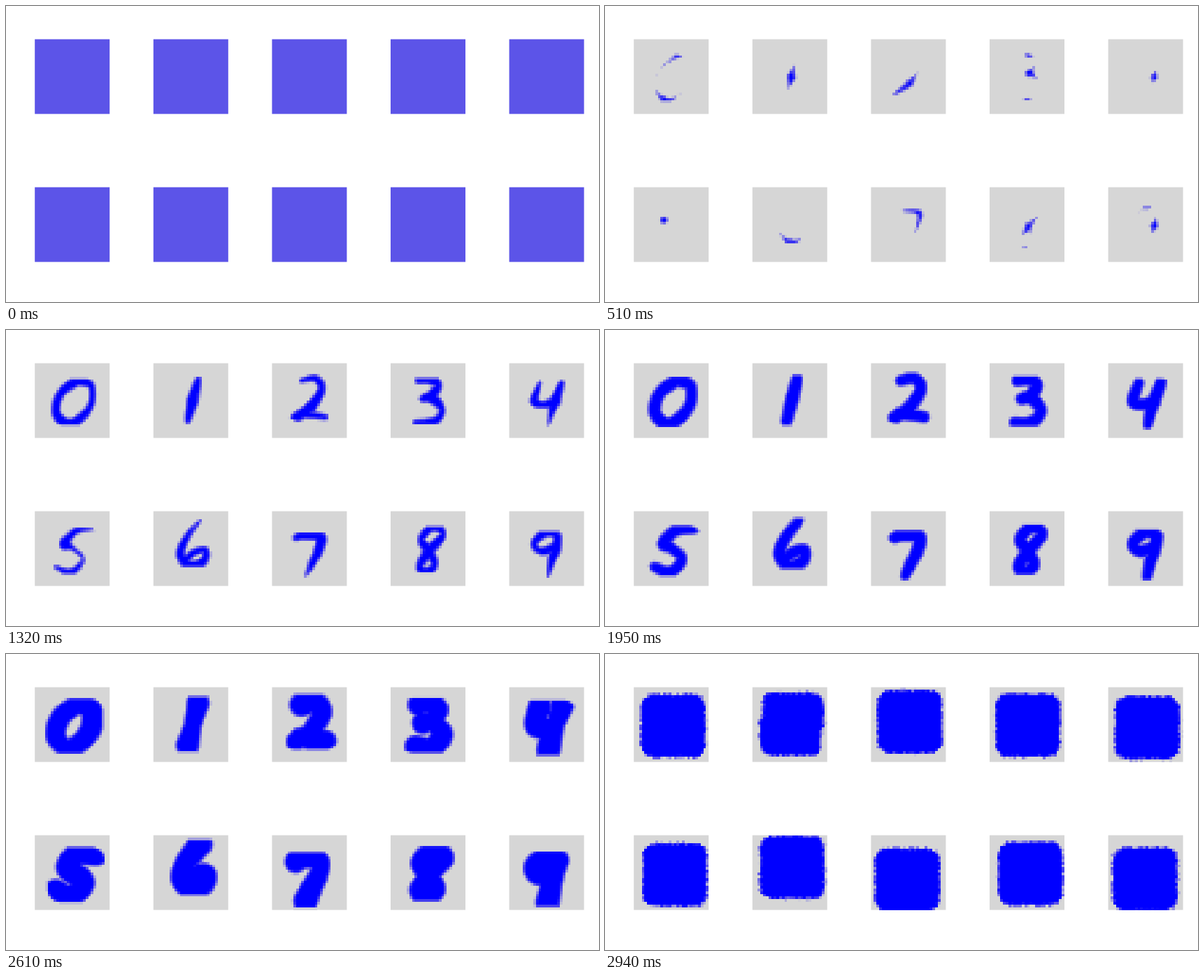
An HTML page with a canvas that plays this animation: 848x424 px, repeating every 2970 ms.

```html
<!DOCTYPE html>
<html lang="en">
<head>
<meta charset="utf-8">
<title>Digit quantiles</title>
<style>
html, body { margin: 0; width: 100%; height: 100%; overflow: hidden; background: #fff; }
canvas { display: block; }
</style>
</head>
<body>
<canvas id="stage" width="848" height="424"></canvas>
<script>
const ctx = document.getElementById('stage').getContext('2d');
const N = 28, SIZE = 107, CELL = SIZE / N, STEP = 30, FRAMES = 99;
const LOW = [214, 214, 214], MID = [92, 84, 232], HIGH = [0, 0, 255];

const clamp = (v, lo = 0, hi = 1) => Math.min(hi, Math.max(lo, v));
const mix = (a, b, t) => a + (b - a) * t;

// Smooth curve through key points [x, y, strength], sampled densely
function spline(pts) {
  const out = [];
  for (let i = 0; i < pts.length - 1; i++) {
    const p = pts[Math.max(i - 1, 0)], a = pts[i], b = pts[i + 1], n = pts[Math.min(i + 2, pts.length - 1)];
    for (let t = 0; t <= 1; t += 0.125) {
      const curve = k => a[k] + 0.5 * t * (b[k] - p[k] +
        t * (2 * p[k] - 5 * a[k] + 4 * b[k] - n[k] + t * (3 * (a[k] - b[k]) + n[k] - p[k])));
      out.push({ x: curve(0), y: curve(1), s: mix(a[2], b[2], t) });
    }
  }
  return out;
}

const digits = [];
function digit(...strokes) {
  const i = digits.length, dots = strokes.flatMap(spline);
  const middle = vals => (Math.min(...vals) + Math.max(...vals)) / 2;
  digits.push({
    x: 41.2 + 169.6 * (i % 5), y: 47.6 + 212 * Math.floor(i / 5), dots,
    cx: middle(dots.map(d => d.x)), cy: middle(dots.map(d => d.y))
  });
}

// Strength: 1 is inked in nearly every sample, 0 only in rare ones
digit([[62, 24, .85], [81, 33, .45], [79, 62, .45], [58, 84, .75], [42, 85, .9], [30, 68, .6], [38, 42, .62], [62, 24, .85]]);
digit([[64, 23, .3], [56, 54, 1], [49, 83, .3]]);
digit([[42, 25, .2], [62, 22, .5], [71, 37, .5], [55, 63, .95], [34, 78, .75]],
  [[40, 72, .6], [56, 74, .45], [76, 77, .3]]);
digit([[40, 25, .4], [55, 23, .85], [68, 32, .45], [56, 49, .95]],
  [[46, 51, .4], [58, 49, .95], [73, 65, .4], [68, 79, .45], [54, 86, .8], [36, 85, .35]]);
digit([[44, 28, .15], [36, 54, .62], [50, 59, .4], [66, 55, .9]],
  [[76, 26, .18], [66, 53, .9], [60, 72, .3], [56, 90, 0]]);
digit([[88, 26, 0], [62, 27, .4], [49, 37, .45], [43, 47, .95], [52, 52, .25], [69, 68, .12], [52, 87, .5], [30, 80, .15]]);
digit([[67, 13, .05], [48, 37, .45], [39, 62, .6], [54, 79, .95], [72, 71, .6], [74, 56, .45], [58, 59, .4], [46, 70, .5]]);
digit([[34, 38, .35], [46, 34, .72], [69, 37, .9], [66, 57, .75], [58, 73, .5], [48, 94, 0]]);
digit([[55, 57, .9], [44, 40, .4], [60, 23, .65], [75, 33, .4], [55, 57, .95], [42, 78, .4], [50, 87, .75], [63, 77, .35], [55, 57, .9]]);
digit([[70, 36, .45], [55, 29, .8], [36, 45, .42], [44, 57, .4], [64, 53, .8]],
  [[70, 36, .45], [66, 55, .95], [60, 73, .45], [55, 96, 0]]);

function noise(i, j, k) {
  const s = Math.sin(i * 127.1 + j * 311.7 + k * 74.7) * 43758.5453;
  return s - Math.floor(s) - 0.5;
}

// Half-width of the ink at quantile q: strong parts first, weak tips flare late
function halfWidth(s, q) {
  const thin = mix(-13, 5, s), mid = mix(-2, 8, Math.sqrt(s)), wide = mix(21, 13, s);
  if (q < 0.17) return thin - 7 * (1 - q / 0.17);
  if (q < 0.44) return mix(thin, mid, (q - 0.17) / 0.27);
  if (q < 0.92) {
    const u = (q - 0.44) / 0.48;
    return mix(mid, wide, u * (0.45 + 0.4 * u + 0.15 * u * u));
  }
  return wide + 30 * ((q - 0.92) / 0.06) ** 1.8;
}

// Signed depth inside the rounded frame that limits the ink
function frameDepth(dx, dy, inset) {
  const R = 18, x = Math.abs(dx) - 46 + inset + R, y = Math.abs(dy) - 45 + inset + R;
  return R - Math.hypot(Math.max(x, 0), Math.max(y, 0)) - Math.min(Math.max(x, y), 0);
}

function levels(g, k, q) {
  const late = clamp((q - 0.92) / 0.06);
  const inset = late ? 5 * (1 - late) : Math.min(12, 5 + (0.92 - q) * 15);
  const widths = g.dots.map(d => halfWidth(d.s, q));
  const out = [];
  for (let j = 0; j < N; j++) for (let i = 0; i < N; i++) {
    const x = (i + 0.5) * CELL, y = (j + 0.5) * CELL;
    let depth = -99;
    g.dots.forEach((d, m) => {
      depth = Math.max(depth, widths[m] - Math.sqrt((x - d.x) ** 2 + (y - d.y) ** 2));
    });
    const rough = noise(i, j, k) * late * 3;
    const edge = frameDepth(x - g.cx, y - g.cy, inset);
    out.push(clamp(0.5 + Math.min((depth + rough) / 5.5, (edge + rough) / 4)));
  }
  return out;
}

function shade(v) {
  const [from, to, t] = v < 0.5 ? [LOW, MID, v * 2] : [MID, HIGH, v * 2 - 1];
  return `rgb(${from.map((c, i) => Math.round(mix(c, to[i], t)))})`;
}

function draw(frame) {
  ctx.fillStyle = '#fff';
  ctx.fillRect(0, 0, 848, 424);
  ctx.fillStyle = shade(frame ? 0 : 0.5);
  for (const g of digits) ctx.fillRect(g.x, g.y, SIZE, SIZE);
  if (!frame) return;

  const all = digits.map((g, k) => levels(g, k, frame / 100));
  const top = Math.max(...all.flat()) || 1;
  digits.forEach((g, k) => all[k].forEach((v, m) => {
    if (v / top < 0.01) return;
    const left = n => Math.round(g.x + n * CELL), up = n => Math.round(g.y + n * CELL);
    const i = m % N, j = Math.floor(m / N);
    ctx.fillStyle = shade(v / top);
    ctx.fillRect(left(i), up(j), left(i + 1) - left(i), up(j + 1) - up(j));
  }));
}

let shown = -1;
function tick() {
  const frame = Math.floor(performance.now() / STEP) % FRAMES;
  if (frame !== shown) draw(shown = frame);
  requestAnimationFrame(tick);
}
tick();
</script>
</body>
</html>
```
